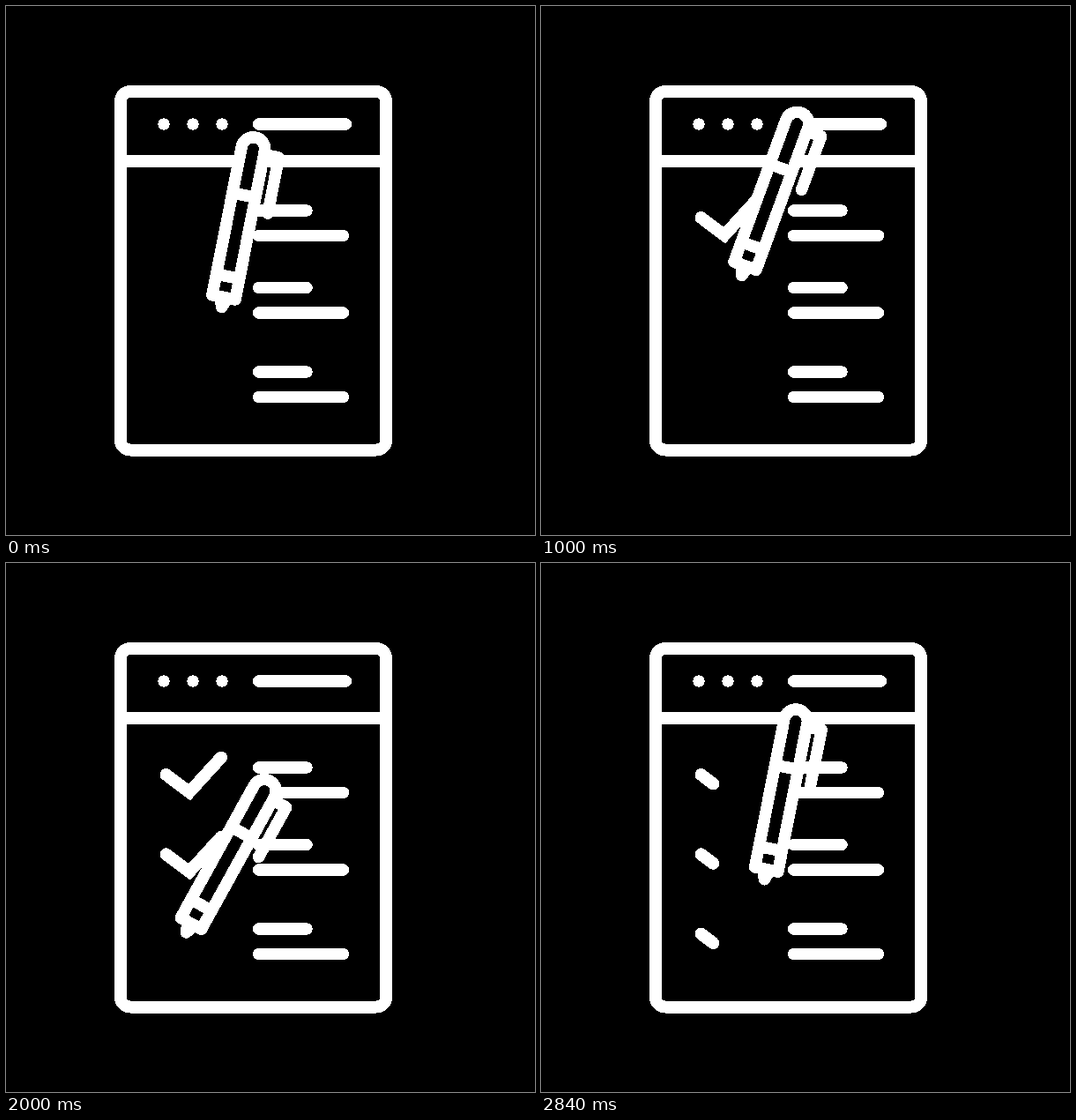
Recreate the animation shown at these times as an HTML page. Size 600 px wide and 600 px high, loop 2880 ms.

```html
<!DOCTYPE html>
<html lang="en">
<head>
<meta charset="utf-8">
<title>Checklist</title>
<style>
  html, body { margin: 0; height: 100%; overflow: hidden; background: #000; }
  svg { display: block; width: 100vw; height: 100vh; }
  .ink { fill: none; stroke: #fff; stroke-width: 13.5; stroke-linecap: round; stroke-linejoin: round; shape-rendering: crispEdges; }
  .check { stroke-width: 14; stroke-linejoin: miter; }
</style>
</head>
<body>
<svg viewBox="0 0 600 600" class="ink">
  <rect x="130" y="97" width="301" height="406.5" rx="11" stroke-width="14"/>
  <path d="M134 176H427M179 134h.01M212 134h.01M245 134h.01M286.5 134H385.5"/>
  <path d="M286.5 232H341M286.5 260.5H382.5M286.5 319.5H341M286.5 348H382.5M286.5 415H341M286.5 443.5H382.5"/>
  <g id="checks"></g>
  <g id="pen">
    <path d="M13.3 -185.5H30.5V-121"/>
    <path d="M-4 -18L0 -6.5L4 -18" fill="#fff"/>
    <path d="M-13.3 -18V-189.5a13.3 13.3 0 0 1 26.6 0V-18Z" fill="#000"/>
    <path d="M-13.3 -42h26.6M-13.3 -136h26.6"/>
  </g>
</svg>
<script>
const LOOP = 2880, STEP = 40, ROW_TIME = 920, ROW_GAP = 90.3;
const LAND = 280, WRITE = 320, LIFT = 680, PARK = 840, RETURN = PARK + 2 * ROW_TIME;
const BEND = 0.39; // share of the tick's length before its corner
const TILT = 40, UPRIGHT = 11.2;
const pen = document.getElementById('pen');
const checkGroup = document.getElementById('checks');

const checks = [0, 1, 2].map(row => {
  const path = document.createElementNS('http://www.w3.org/2000/svg', 'path');
  path.setAttribute('d', `M181.5 ${240 + row * ROW_GAP}l26.5 20l36 -39.5`);
  path.setAttribute('pathLength', 1);
  path.setAttribute('class', 'check');
  return checkGroup.appendChild(path);
});

const progress = (t, from, to) => Math.min(1, Math.max(0, (t - from) / (to - from)));
const mix = (a, b, p) => a.map((v, i) => v + (b[i] - v) * p);

// Poses are [tip x, tip y, angle].
const rest = [243.5, 348, UPRIGHT];
const onRow = (x, y, angle, row) => [x, y + row * ROW_GAP, angle];
const landed = row => onRow(179, 265, TILT, row);
const start = row => onRow(176, 258.5, TILT, row);
const corner = row => onRow(208, 262, TILT, row);
const end = row => onRow(243, 221, TILT, row);
const parked = row => onRow(287, 253.5, UPRIGHT, row);

function penPose(t) {
  if (t >= RETURN) return mix(parked(2), rest, progress(t, RETURN, LOOP));
  const row = t < PARK ? 0 : t < PARK + ROW_TIME ? 1 : 2;
  const local = t - row * ROW_TIME;
  if (local < LAND) {
    const from = row ? parked(row - 1) : rest;
    const p = 1 - (1 - progress(local, row ? PARK - ROW_TIME : 120, LAND)) ** 1.44;
    const [x, y] = mix(from, landed(row), p);
    return [x, y, UPRIGHT + (TILT - UPRIGHT) * p ** 2.1];
  }
  if (local < WRITE) return mix(landed(row), start(row), progress(local, LAND, WRITE));
  if (local < LIFT) {
    const p = progress(local, WRITE, LIFT);
    return p < BEND
      ? mix(start(row), corner(row), p / BEND)
      : mix(corner(row), end(row), (p - BEND) / (1 - BEND));
  }
  return mix(end(row), parked(row), progress(local, LIFT, PARK));
}

function draw(now) {
  const t = Math.floor(now % LOOP / STEP) * STEP;
  const [x, y, angle] = penPose(t);
  pen.setAttribute('transform', `translate(${x} ${y}) rotate(${angle})`);
  const kept = 1 - progress(t, RETURN, LOOP);
  checks.forEach((path, row) => {
    const drawn = kept * progress(t - row * ROW_TIME, WRITE, LIFT);
    path.style.visibility = drawn > 0 ? 'visible' : 'hidden';
    path.style.strokeDasharray = drawn < 1 ? `${drawn} 2` : 'none';
  });
}

const began = performance.now();
function tick() {
  draw(performance.now() - began);
  requestAnimationFrame(tick);
}
tick();
</script>
</body>
</html>
```
